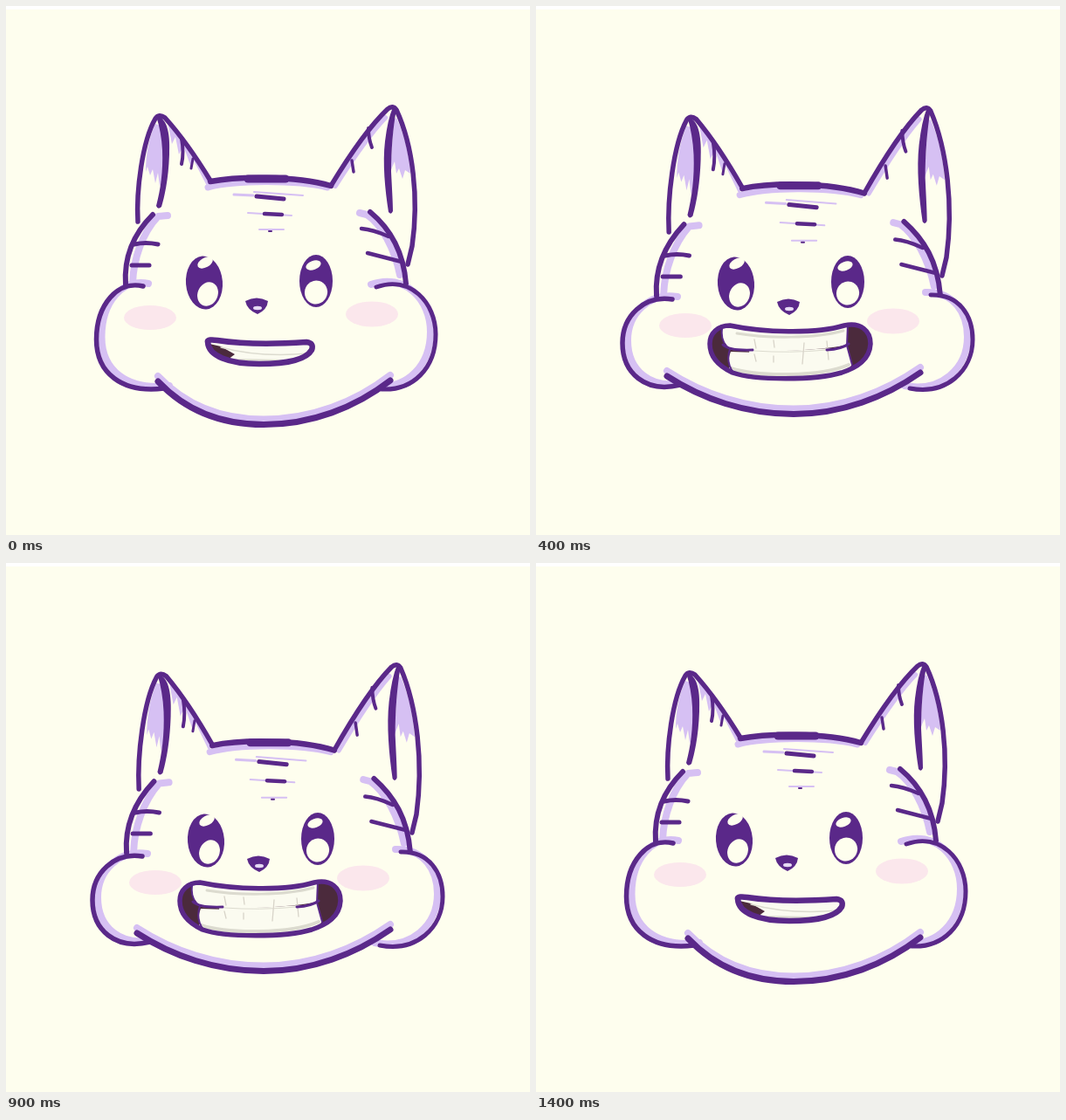
Animation of 600x606 px, one loop 1700 ms. Source, as an HTML page with a canvas:

```html
<!DOCTYPE html>
<html lang="en">
<head>
<meta charset="utf-8">
<title>Talking cat</title>
<style>
html, body { margin: 0; width: 100%; height: 100%; overflow: hidden; background: #fefeee; }
canvas { display: block; }
</style>
</head>
<body>
<canvas id="stage" width="600" height="606"></canvas>
<script>
const ctx = document.getElementById('stage').getContext('2d');
const CREAM = '#fefeee', INK = '#5a2889', LILAC = '#d6c0f3', BLUSH = '#fbe7ec';
const DARK = '#4b2a3c', TOOTH = '#fbfbf0', SHADE = '#dcdbcf', RED = '#c04f59';

// Cheeks and jaw, one set per jaw width
const round = {
  left: 'M157 321 C128 314 103.5 342 103.5 382 C103.5 420 132 444 181 438',
  right: 'M424 322 C463 308 492 340 492 376 C492 415 466 441 430 439',
  jaw: 'M174 430 C205 463 245 479.5 295 479.5 C350 479.5 400 460 440 429'
};
const broad = {
  left: 'M156 336 C124 331 99 355 99 386 C99 420 125 444 165 434',
  right: 'M452 331 C485 330 500 355 500 382 C500 418 470 446 428 438',
  jaw: 'M150 424 C190 450 240 467.5 295 467.5 C350 467.5 400 448 440 420'
};
const wide = {
  left: 'M152 327 C116 322 91 345 91 372 C91 405 121 426 160 421',
  right: 'M466 322 C500 318 518 345 518 370 C518 405 485 434 432 427',
  jaw: 'M146 412 C185 440 240 455 297 455 C355 455 410 440 453 409'
};

const nums = s => s.match(/-?[\d.]+/g).map(Number);
const mix = (a, b, t) => a + (b - a) * t;
const mapPath = (s, f) => s.replace(/(-?[\d.]+) (-?[\d.]+)/g, (_, x, y) => f(+x, +y).join(' '));
const shift = (s, dx, dy) => mapPath(s, (x, y) => [x + dx, y + dy]);

// skull: dx at the left edge, dx per pixel, then dy at each of LEVELS
const LEVELS = [120, 200, 260, 320];
function pose(skull, face, blush, low, dx = 0, dy = 0, stretch = 1) {
  const place = s => mapPath(s, (x, y) => [x + dx, 320 + dy + (y - 320) * stretch]);
  return { skull, face, blush, left: place(low.left), right: place(low.right), jaw: place(low.jaw) };
}
const poses = {
  smile: pose([0, 0, 0, 0, 0, 0], [0, 0], [165, 357, 419, 353], round),
  open: pose([1, 0, -7, -7, -7, -7], [1, -8], [166, 350, 420, 346], round, 1, -7.5),
  grin: pose([1, .012, 1, 8, 13, 13], [2, 1], [171, 366, 409, 361], broad),
  oh: pose([0, 0, 10, 12, 12, 12], [0, 9.5], [166, 367, 420, 363], round, 0, 16, 1.025),
  cheer: pose([-6, .079, 0, 4, 6, 6], [2, -2], [168, 355, 421, 351], wide)
};

function blend(a, b, t) {
  const list = k => a[k].map((v, i) => mix(v, b[k][i], t));
  const path = k => {
    const n = nums(b[k]);
    let i = 0;
    return a[k].replace(/-?[\d.]+/g, v => mix(+v, n[i++], t));
  };
  return {
    skull: list('skull'), face: list('face'), blush: list('blush'),
    left: path('left'), right: path('right'), jaw: path('jaw')
  };
}

function fill(d, color) {
  ctx.fillStyle = color;
  ctx.fill(new Path2D(d));
}
function line(d, w, color = INK) {
  ctx.strokeStyle = color;
  ctx.lineWidth = w;
  ctx.stroke(new Path2D(d));
}
function oval(x, y, rx, ry, color, turn = 0) {
  ctx.fillStyle = color;
  ctx.beginPath();
  ctx.ellipse(x, y, rx, ry, turn, 0, 7);
  ctx.fill();
}

function drawSkull([x0, kx, ...dy]) {
  const warp = d => mapPath(d, (x, y) => {
    const i = y < LEVELS[1] ? 0 : y < LEVELS[2] ? 1 : 2;
    const t = Math.min(1, Math.max(0, (y - LEVELS[i]) / (LEVELS[i + 1] - LEVELS[i])));
    return [x + x0 + (x - 135) * kx, y + mix(dy[i], dy[i + 1], t)];
  });
  const area = (d, c) => fill(warp(d), c);
  const draw = (d, w, c) => line(warp(d), w, c);

  // lilac shading
  area('M171 135 C163 152 160 172 160 190 L162 184 L165 194 L168 187 L171 203 L174 191 L176 207 L182 190 L180 138 Z', LILAC);
  area('M185 133 L190 158 L194 150 L198 170 L203 160 L211 182 L215 177 L230 206 L236 200 Z', LILAC);
  area('M444 130 L440 190 L445 178 L447 192 L450 186 L454 198 L457 188 L463 192 C461 165 455 145 447 128 Z', LILAC);
  draw('M377 206 C396 176 415 148 434 128', 6, LILAC);
  draw('M231 208 C262 200 330 199 368 208', 7, LILAC);
  draw('M185 240 L174 241 C156 260 146 290 145 317', 8, LILAC);
  draw('M405 237 L413 239 C430 250 445 278 451 308', 8, LILAC);
  draw('M261 216 L283 217', 3, LILAC);
  draw('M284 213 L340 217', 2, LILAC);
  draw('M277 237 L327 240', 2, LILAC);
  draw('M290 256 L318 256', 2, LILAC);

  // ears
  draw('M151 247 C149 212 156 155 171 129 Q175 123 182 128 C200 148 217 172 234 200', 5.5);
  area('M172 126 C186 128 188 150 187 170 C186 200 181 220 178 230 Q174 234 172 229 C177 210 180 190 179 165 Q178 145 172 126 Z', INK);
  draw('M372 206 C395 168 416 138 437 118 Q443 113 447 119 C466 160 473 220 465 275 L460 296', 5.5);
  area('M447 118 C443 140 441 165 441 190 C442 210 443 225 443 235 Q441 240 438 236 C434 210 431 180 434 155 Q437 130 443 116 Z', INK);
  draw('M201 152 Q204 168 201 181', 4);
  draw('M214 175 L212 186', 3);
  draw('M415 140 Q415 152 419 162', 4);
  draw('M396 177 L398 190', 3.5);

  // crown and stripes
  draw('M234 201 C265 195 330 194 372 206', 6.5);
  draw('M277 198 L320 198', 9);
  draw('M287 218 L318 221', 5);
  draw('M296 238 L316 239', 4.5);
  draw('M301 258 L304 258', 2);
  draw('M168 239 C145 262 135 290 137 319', 6);
  draw('M147 273 Q160 270 174 273', 5);
  draw('M144 297 L164 297', 5);
  draw('M417 236 C440 255 455 280 458 318', 6);
  draw('M407 255 Q420 256 438 264', 4.5);
  draw('M414 283 L453 293', 4.5);
}

function drawFace([dx, dy]) {
  ctx.save();
  ctx.translate(dx, dy);
  oval(227, 317, 21, 30.5, INK, -.08);
  oval(228, 294, 9.5, 5.5, CREAM, -.5);
  oval(231, 330, 11.5, 14, CREAM, .4);
  oval(355, 315, 19, 30, INK);
  oval(352, 297, 9, 5, CREAM, -.35);
  oval(355, 328, 13, 13.5, CREAM, .3);
  fill('M274 338 Q287 331 300 338 Q299 348 288 353 Q276 348 274 338 Z', INK);
  oval(288, 346, 5, 2.2, '#e6daf4');
  ctx.restore();
}

// box is the natural outer box; inside() is drawn clipped to the shape
const mouths = {
  smile: {
    box: [228, 380, 126, 33], fill: TOOTH, edge: 6.5,
    shape: 'M231 385 C230 382 236 382 242 383 C275 388 315 387 344 385 Q353 386 350 394 C343 406 318 410 290 410 C255 410 232 401 231 385 Z',
    inside() {
      fill('M233 387 L246 390 L262 399 L254 405 L240 400 Z', DARK);
      line('M246 391 Q290 403 346 398', 1.5, SHADE);
      line('M255 405 L320 406', 2, SHADE);
    }
  },
  open: {
    box: [214, 353, 170, 99], fill: DARK, edge: 6,
    shape: 'M217 381 C215 366 227 363 245 366 C275 371 300 371 325 362 C355 353 381 353 381 376 C380 415 345 449 298 449 C245 449 219 415 217 381 Z',
    inside() {
      fill('M222 420 C260 403 320 398 372 418 L345 455 L240 455 Z', RED);
      line('M228 421 C265 405 320 402 366 418', 6, '#8d1d4d');
      line('M225 417 C265 401 320 398 370 414', 3);
      oval(332, 419, 9, 3.5, '#fff', .2);
      fill('M243 440 C265 427 320 428 342 439 L330 456 L255 456 Z', TOOTH);
      line('M243 440 C265 427 320 428 342 439', 4);
      fill('M222 374 L230 355 L382 350 L377 372 C362 382 330 389 292 389 C262 389 240 385 222 374 Z', TOOTH);
      line('M250 383 C290 389 330 385 360 377', 4, SHADE);
      line('M222 373 C240 386 262 390 292 390 C330 390 362 383 379 371', 3);
    }
  },
  grin: {
    box: [196, 363, 190, 67], fill: DARK, edge: 5.5,
    shape: 'M199 387 C199 375 208 366 222 366 C260 374 320 376 353 366 C372 362 383 372 383 387 C382 405 368 414 350 420 C320 429 250 429 225 420 C208 412 199 402 199 387 Z',
    inside() {
      fill('M213 370 L220 360 L357 360 L356 388 C330 395 250 397 224 394 Q211 385 213 370 Z', TOOTH);
      fill('M223 396 C260 398 330 396 356 389 L362 410 L350 430 L228 430 Q217 408 223 396 Z', TOOTH);
      line('M246 396 Q290 398 336 394', 4, TOOTH);
      line('M230 375 C265 381 320 381 352 372', 3, SHADE);
      line('M223 415 C255 425 325 425 358 411', 4, SHADE);
      line('M250 395 Q290 398 333 394', 1, SHADE);
      line('M250 382 L252 392 M272 383 L273 391 M307 386 L305 410 M333 384 L335 405 M250 399 L252 407 M272 401 L272 408', 1.3, '#d8d4c9');
      line('M214 388 Q221 395 248 394', 3);
      line('M333 394 Q350 393 358 387', 3);
      line('M213 370 Q211 385 222 393 Q217 408 226 420 M357 365 L356 389 L362 411', 2);
    }
  },
  oh: {
    box: [237, 383, 107, 64], fill: DARK, edge: 5.5,
    shape: 'M240 429 C243 417 252 418 255 410 C259 394 275 386 292 386 C312 386 325 400 328 411 C331 420 337 422 341 432 C335 434 325 431 316 434 C310 441 302 444 291 444 C278 444 268 438 261 429 C252 426 248 430 240 429 Z',
    inside() {
      fill('M250 411 L255 380 L330 380 L332 412 C310 402 275 402 250 411 Z', TOOTH);
      line('M264 403 C285 399 305 400 320 404', 4, SHADE);
      line('M248 412 C275 402 310 403 332 412', 5);
      fill('M256 427 C280 424 305 426 320 434 L310 450 L268 450 Z', TOOTH);
      line('M268 436 Q290 444 312 436', 3, SHADE);
      line('M244 426 C275 424 305 426 336 431', 4);
    }
  },
  cheer: {
    box: [186, 365, 212, 69], fill: DARK, edge: 5.5,
    shape: 'M189 390 C189 375 195 367 215 370 C250 378 290 379 320 375 C350 367 394 364 395 388 C395 411 365 431 300 431 C230 431 189 415 189 390 Z',
    inside() {
      oval(288, 409, 36, 6, '#cd4548');
      line('M250 409 Q288 396 328 409', 3);
      fill('M190 408 C240 413 340 413 393 402 L370 440 L215 440 Z', TOOTH);
      line('M215 421 C260 431 335 430 373 415', 4, SHADE);
      line('M194 408 C240 412 340 413 391 400', 3);
      fill('M194 374 L205 360 L390 360 L393 377 C375 390 340 396 300 396 C260 396 215 388 194 374 Z', TOOTH);
      line('M235 386 C280 393 340 391 373 382', 3, SHADE);
      line('M194 374 C215 388 260 396 300 396 C340 396 375 390 393 377', 3);
    }
  }
};

function drawMouth(name, to) {
  const m = mouths[name], [x, y, w, h] = m.box;
  const [tx, ty, tw, th] = to || m.box;
  ctx.save();
  ctx.translate(tx, ty);
  ctx.scale(tw / w, th / h);
  ctx.translate(-x, -y);
  ctx.save();
  ctx.clip(new Path2D(m.shape));
  fill(m.shape, m.fill);
  m.inside();
  ctx.restore();
  line(m.shape, m.edge);
  ctx.restore();
}

// One entry per 100 ms: pose, second pose, blend, mouth, mouth box
const steps = [
  ['smile', 'smile', 0, 'smile'],
  ['smile', 'open', .5, 'open', [220, 366, 150, 66]],
  ['open', 'open', 0, 'open'],
  ['open', 'grin', .5, 'cheer', [202, 358, 184, 74]],
  ['grin', 'grin', 0, 'grin'],
  ['grin', 'oh', .5, 'grin', [216, 375, 150, 62]],
  ['oh', 'oh', 0, 'oh', [237, 388, 107, 54]],
  ['oh', 'oh', 0, 'oh'],
  ['oh', 'grin', .5, 'grin', [216, 375, 150, 62]],
  ['grin', 'grin', 0, 'grin'],
  ['cheer', 'cheer', 0, 'cheer'],
  ['open', 'open', 0, 'open'],
  ['smile', 'smile', 0, 'open', [214, 364, 168, 74]],
  ['smile', 'smile', 0, 'open', [220, 372, 146, 54]],
  ['smile', 'smile', 0, 'smile']
];

function draw([from, to, t, mouth, box]) {
  const p = blend(poses[from], poses[to], t);
  ctx.fillStyle = CREAM;
  ctx.fillRect(0, 0, 600, 606);
  ctx.fillStyle = '#fff';
  ctx.fillRect(0, 0, 600, 4);
  ctx.lineCap = ctx.lineJoin = 'round';
  line(shift(p.left, 6, -3), 8, LILAC);
  line(shift(p.right, -6, -3), 8, LILAC);
  line(shift(p.jaw, 0, -6), 8, LILAC);
  drawSkull(p.skull);
  const [lx, ly, rx, ry] = p.blush;
  oval(lx, ly, 30, 14, BLUSH);
  oval(rx, ry, 30, 14.5, BLUSH);
  line(p.left, 5.5);
  line(p.right, 5);
  line(p.jaw, 7);
  drawFace(p.face);
  drawMouth(mouth, box);
}

let shown = -1;
function tick() {
  const i = Math.min(14, Math.floor(performance.now() % 1700 / 100));
  if (i !== shown) draw(steps[shown = i]);
  requestAnimationFrame(tick);
}
tick();
</script>
</body>
</html>
```
